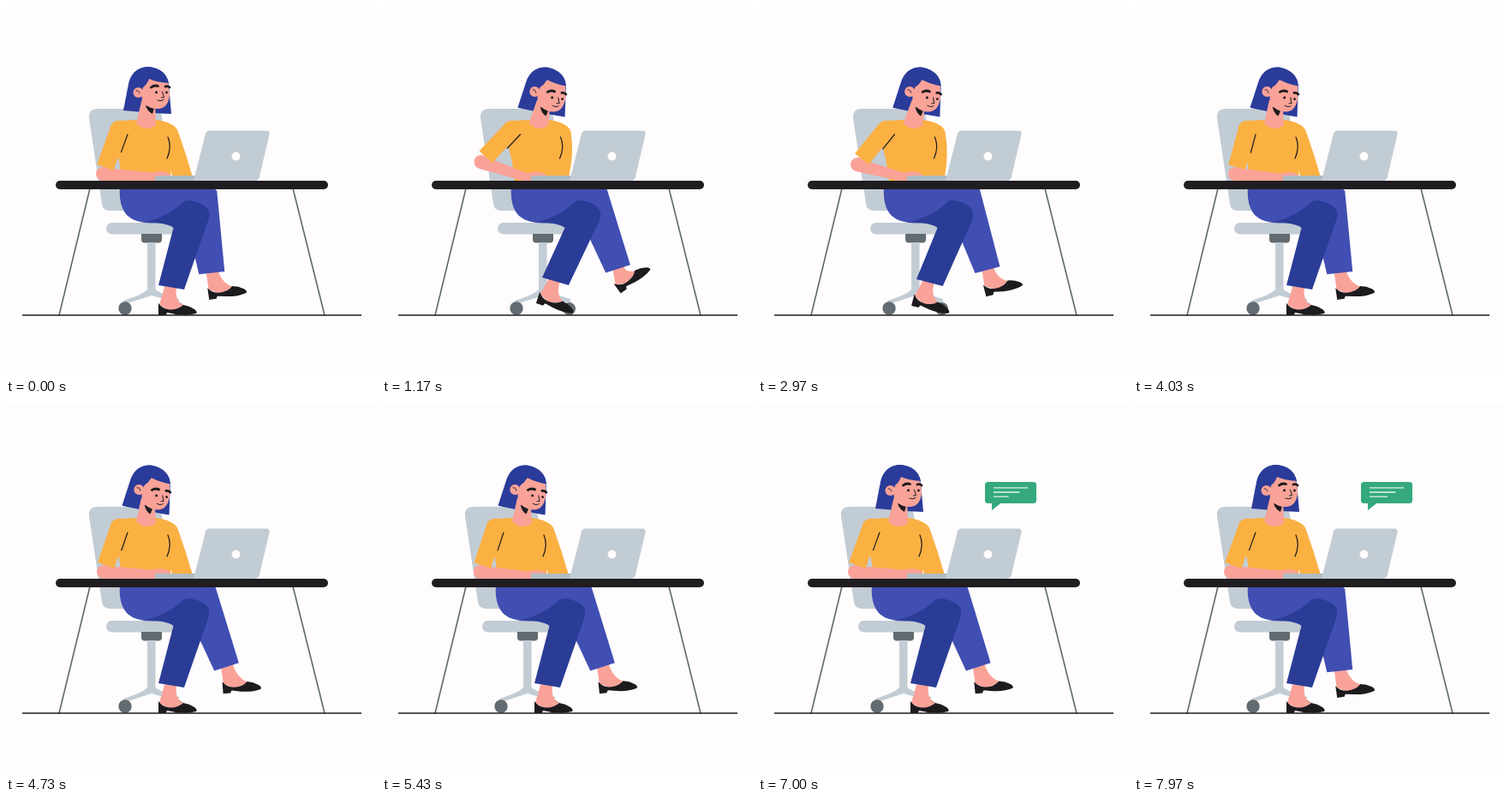
An HTML page with a canvas for the animation above (8000 ms loop, 432 by 432 pixels).

```html
<!DOCTYPE html>
<html lang="en">
<head>
<meta charset="utf-8">
<title>Woman at a desk</title>
<style>
html, body { margin: 0; height: 100%; overflow: hidden; background: #fefcfd; }
canvas { display: block; width: 432px; height: 432px; }
</style>
</head>
<body>
<canvas id="stage"></canvas>
<script>
const LOOP = 8000;
const GREY = '#c2ccd4', STEEL = '#626b6f', BLACK = '#1d1b1e', SKIN = '#f9a298';
const SHIRT = '#fbb042', HAIR = '#2a3b9a', NEAR = '#2a3c96', FAR = '#414eb2', GREEN = '#35a97d';

const ctx = stage.getContext('2d');
const ratio = window.devicePixelRatio || 1;
stage.width = stage.height = 432 * ratio;

// Smooth step from 0 to 1 between two times
function ramp(t, from, to) {
  const u = Math.min(Math.max((t - from) / (to - from), 0), 1);
  return u * u * (3 - 2 * u);
}

const forward = t => ramp(t, 230, 1030) - ramp(t, 2730, 3530);
const backward = t => ramp(t, 5600, 6250) - ramp(t, 6400, 6950);

// Everything follows from rolling forward, leaning back, working and kicking.
function poseAt(t) {
  const fwd = forward(t), back = backward(t);
  const work = ramp(t, 230, 1030) - ramp(t, 5550, 6200);
  const kick = fwd + ramp(t, 4030, 4450) - ramp(t, 6950, 7650);
  return {
    chair: 18 * fwd - 11.5 * back,
    torso: 19.5 * forward(t - 80) - 12 * back,
    head: 23 * forward(t - 130) - 2 * work - 10 * back,
    tilt: 7 * (work - back),
    elbowX: 113 + work * (2.5 + 2.5 * (1 - fwd) * Math.cos((t - 4030) / 172)),
    elbowY: 196 - 14 * fwd,
    knee: 10 + 11.7 * kick,
    foot: -8 - kick * (12 + 16 * Math.cos((t - 1170) * .008)),
    tap: Math.sin(t / 45) * (ramp(t, 230, 500) - ramp(t, 7500, 7950))
  };
}

function fill(color, d) {
  ctx.fillStyle = color;
  ctx.fill(new Path2D(d));
}

function line(color, width, d, cap = 'round') {
  ctx.strokeStyle = color;
  ctx.lineWidth = width;
  ctx.lineCap = cap;
  ctx.stroke(new Path2D(d));
}

function disc(color, x, y, r) {
  ctx.fillStyle = color;
  ctx.beginPath();
  ctx.arc(x, y, r, 0, 7);
  ctx.fill();
}

function box(color, x, y, w, h, r) {
  ctx.fillStyle = color;
  ctx.beginPath();
  ctx.roundRect(x, y, w, h, r);
  ctx.fill();
}

function group(x, y, degrees, draw) {
  ctx.save();
  ctx.translate(x, y);
  ctx.rotate(degrees * Math.PI / 180);
  draw();
  ctx.restore();
}

function turn(x, y, degrees) {
  const a = degrees * Math.PI / 180, c = Math.cos(a), s = Math.sin(a);
  return [x * c - y * s, x * s + y * c];
}

function drawChair() {
  fill(GREY, 'M107 120H172Q181 120 182 130L198 239H122Q113 239 112 231L97 131Q96 120 107 120Z');
  box(GREY, 117, 253, 92, 13.5, 6.7);
  box(STEEL, 158, 266, 24, 10.5, [0, 0, 4, 4]);
  fill(GREY, 'M165 276H174.500V331Q180 336 202 342V347L170 338L139 348L137 344Q160 337 165 331Z');
  disc(STEEL, 139, 353, 7.7);
  disc(STEEL, 200.5, 353.5, 7.5);
}

// (cx, cy) is the trouser cuff, (hx, hy) the top of the heel.
function drawFoot(cx, cy, hx, hy, angle) {
  const point = (x, y) => {
    const [dx, dy] = turn(x, y, angle);
    return `${hx + dx} ${hy + dy}`;
  };
  fill(SKIN, `M${cx - 7} ${cy - 4}L${cx + 7} ${cy - 4}Q${point(17, -3)} ${point(30, 3)}L${point(14, 9)}L${point(1, 2)}Z`);
  group(hx, hy, angle, () =>
    fill(BLACK, 'M0 0Q5 7 13 7.500Q23 8 29 2Q36 3 42 7Q46 10 44 12Q34 15 21 13L10 11L8.500 14H0Z'));
}

function drawLegs(pose) {
  const dx = pose.chair, kx = 225 + dx;
  const [cx, cy] = turn(0, 88, -pose.knee);
  drawFoot(kx + cx, 225 + cy, kx + cx - 5, 225 + cy + 17.5, pose.foot);
  group(kx, 225, -pose.knee, () => fill(FAR, 'M-20 0L-15 87L15 89L22.500 -5Q20 -12 10 -14L-20 -8Z'));
  group(dx, 0, 0, () => fill(FAR, 'M133 210Q131 234 142 245Q152 254 172 253.500H215L240 222V210Z'));

  // The near foot stays on its toe while the chair rolls.
  const fore = Math.max(dx, 0);
  const ax = 178 + .5 * fore, ay = 326 - .5 * fore;
  const bx = 208 + .55 * fore, by = 331 - .28 * fore;
  const [hx, hy] = turn(-45, -13, fore);
  drawFoot((ax + bx) / 2, (ay + by) / 2, 223 + hx, 360 + hy, fore);
  group(dx, 0, 0, () => fill(NEAR, `M162 252Q188 247 207 229Q212 225 219 228
    Q241 233 236.500 249L${bx - dx} ${by}L${ax - dx} ${ay}L195.500 259Q188 253 162 252Z`));
}

function drawHairBack() {
  fill(HAIR, 'M137 122L143 91Q147 72 166 71Q187 73 190 92L193 126L172 125Z');
}

function drawFace(tilt) {
  const drop = Math.max(tilt, 0);
  group(0, drop * .25, 0, () => {
    fill(BLACK, 'M163 116L173 119L171 126Q165 123 163 116Z');
    fill(SKIN, 'M157 92Q158 83 170 84L189 88L191 103Q190 119 178 120Q166 121 159 110Z');
  });
  fill(HAIR, 'M145 100Q145 71 166 71Q187 73 190 90Q175 89 167 85Q165 91 160 95L158 104Z');
  disc(SKIN, 154.5, 101, 6);
  line(BLACK, .9, 'M152 99Q155 98 156 102');
  ctx.translate(0, drop * .65);
  line(BLACK, 2.8, 'M169.500 95Q173 92 177.500 93.500M186 94Q189 93 191 95');
  disc(BLACK, 175.5, 100.8, 1.5);
  disc(BLACK, 187.5, 101, 1.4);
  line(BLACK, 1, 'M182.500 100L184.500 106.500L181.500 107M177 110Q181 112 184 109.500');
}

function drawBody(pose) {
  const { torso: tx, head: hx, tilt, elbowX: ex, elbowY: ey, tap } = pose;
  const head = draw => group(164 + hx, 124, tilt, () => {
    ctx.translate(-164, -124);
    draw(tilt);
  });
  head(drawHairBack);

  fill(SHIRT, `M${188 + tx} 138Q${198 + tx} 138 ${201 + tx} 147Q${210 + tx * .75} 172 218 200L${196 + tx * .45} 202L${186 + tx} 178Z`);
  const nape = hx - tx + tilt * .2;
  group(tx, 0, 0, () => {
    fill(SHIRT, 'M122 141Q124 135 132 134L152 133H176Q197 136 201 147L191 178L193 206H136L132 180Z');
    fill(SKIN, `M${158.5 + nape} 110L152 137Q163 148 175 139L${174 + nape} 112Z`);
    line(BLACK, 1.2, 'M189 153Q194 165 188 178');
  });
  head(drawFace);

  // Near arm: forearm first, then the sleeve and its crease
  const sx = 132 + tx, sy = 144;
  const len = Math.hypot(ex - sx, ey - sy), ux = (ex - sx) / len, uy = (ey - sy) / len;
  disc(SKIN, ex, ey, 8);
  fill(SKIN, `M${ex + 2} ${ey - 7}L170 ${194.5 + tap}Q190 ${190 + tap} 193 200V204H165L${ex - 2} ${ey + 8}Z`);
  line(SHIRT, 20.5, `M${sx} ${sy}L${ex - ux * 8} ${ey - uy * 8}`, 'butt');
  disc(SHIRT, sx, sy, 10.2);
  line(BLACK, 1.2, `M${142 + tx} 150l${ux * 22} ${uy * 22}`);
}

function drawDesk() {
  line('#606b67', 1.6, 'M98 213L62 361M335 213L372 361');
  line(BLACK, 1.5, 'M19 361H415', 'butt');
  box('#b0bbc3', 174, 198, 50, 6.5, [2, 0, 0, 0]);
  fill(GREY, 'M237 145.500H304Q308.500 145.500 307.500 150L296 199Q295 204 290 204H219L233 149Q234 145.500 237 145.500Z');
  disc('#fefcfd', 268.5, 175.5, 5);
  box('#201d21', 58, 204, 318, 10, 5);
}

function drawBubble(t) {
  const rise = ramp(t, 5850, 6130), fall = ramp(t, 6150, 6650);
  if (!rise) return;
  group(295, 108 - 60 * rise + 55.5 * fall, 3.5 * (fall - rise), () => {
    const size = 1.1 * rise - .1 * fall;
    ctx.scale(size, size);
    box(GREEN, -30, -12.5, 60, 25, 3.5);
    fill(GREEN, 'M-22 11V20.500L-11 12Z');
    for (let i = 0; i < 3; i++) {
      const grown = Math.min((t - 6310 - i * 180) / 400, 1);
      if (grown > 0) line('#e2f5ec', 1.3, `M-19.500 ${i * 5.2 - 5.7}h${(39 - i * 9.5) * grown}`);
    }
  });
}

function frame(now) {
  const t = now % LOOP, pose = poseAt(t);
  ctx.setTransform(ratio, 0, 0, ratio, 0, 0);
  ctx.fillStyle = '#fefcfd';
  ctx.fillRect(0, 0, 432, 432);
  group(pose.chair, 0, 0, drawChair);
  drawLegs(pose);
  drawBody(pose);
  drawDesk();
  drawBubble(t);
  requestAnimationFrame(frame);
}
requestAnimationFrame(frame);
</script>
</body>
</html>
```
